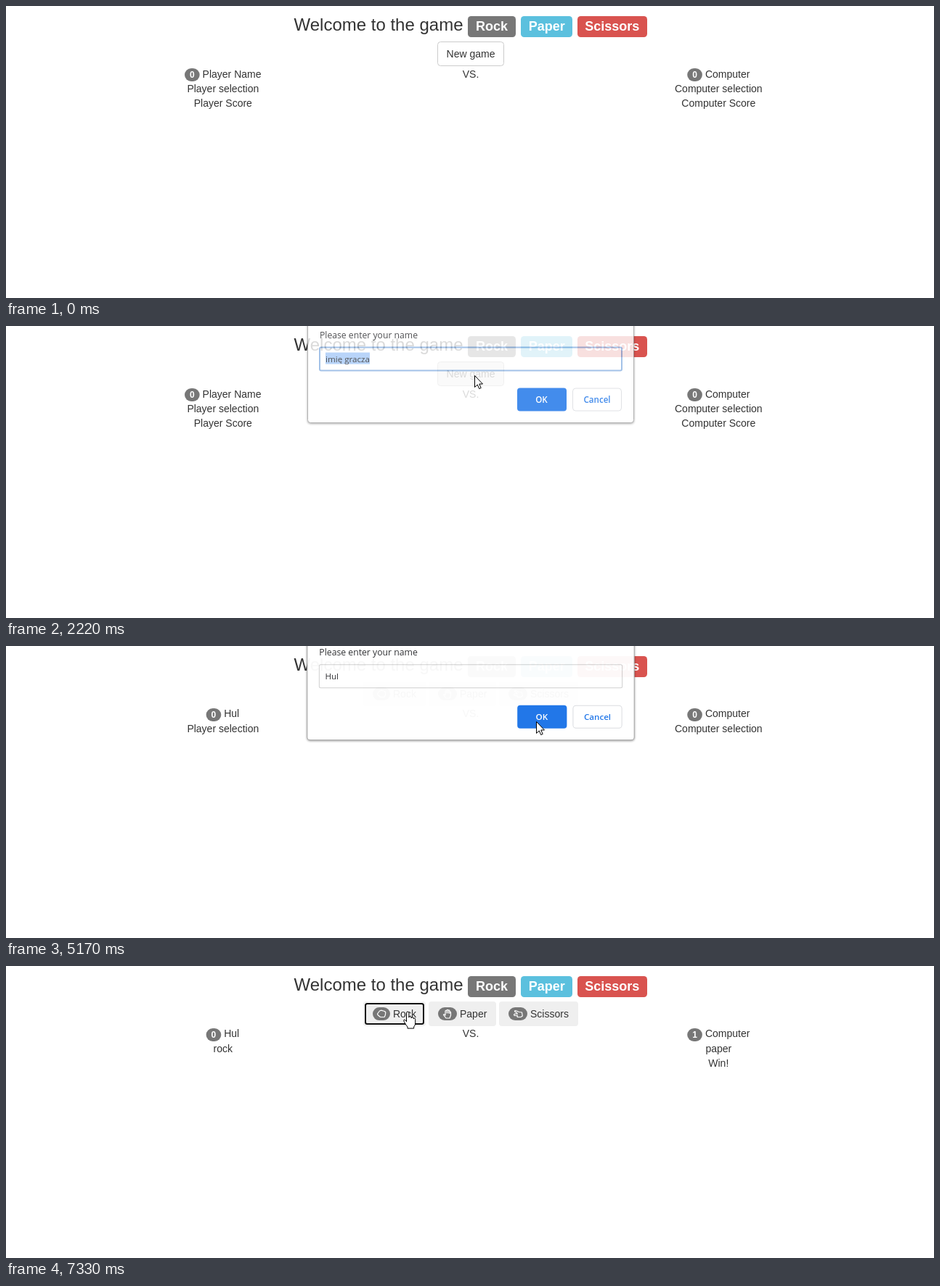
Recreate the animation shown at these times as an HTML page. Size 1278x403 px, loop 8000 ms.

```html
<!DOCTYPE html>
<html lang="en">
<head>
<meta charset="utf-8">
<title>Rock Paper Scissors</title>
<style>
  html, body { margin: 0; width: 100%; height: 100%; overflow: hidden; background: #fff; }
  svg { display: block; font: 14px "Liberation Sans", Arial, sans-serif; fill: #333; }
  .mid { text-anchor: middle; }
  .label { font-weight: bold; font-size: 18px; fill: #fff; }
  .badge { font-weight: bold; font-size: 12px; fill: #fff; text-anchor: middle; }
  .choice { fill: #efefef; }
  .pill { fill: #777; }
  .icon { fill: none; stroke: #fff; stroke-width: 1.2; stroke-linejoin: round; }
  #dialog { font: 12.2px "Open Sans", "Noto Sans", sans-serif; fill: #2b2c2f; }
  #dialog .btn { font-weight: 600; font-size: 11.6px; text-anchor: middle; }
  #entry { font-size: 11.6px; }
  #panel { fill: #fff; stroke: #a2a2a2; filter: drop-shadow(0 1px 1.5px rgba(0,0,0,.4)); }
  #cursor path { fill: #fff; stroke: #000; stroke-linejoin: round; }
</style>
</head>
<body>
<svg width="1278" height="403" viewBox="0 0 1278 403">
  <text x="396.5" y="34" font-size="24">Welcome to the game</text>
  <rect x="636" y="14" width="66" height="29" rx="4.5" fill="#777"/>
  <rect x="709" y="14" width="71" height="29" rx="4.5" fill="#5bc0de"/>
  <rect x="787" y="14" width="96" height="29" rx="4.5" fill="#d9534f"/>
  <g class="label">
    <text x="647" y="34">Rock</text>
    <text x="719.7" y="34">Paper</text>
    <text x="797.3" y="34">Scissors</text>
  </g>

  <g id="intro">
    <rect id="newGame" x="594.5" y="49.5" width="91" height="33" rx="4"/>
    <g class="mid">
      <text x="640" y="71">New game</text>
      <text x="640" y="99">VS.</text>
      <text x="298.8" y="139">Player Score</text>
      <text x="981.3" y="139">Computer Score</text>
    </g>
    <text x="270.6" y="99">Player Name</text>
    <text x="962.9" y="99">Computer</text>
  </g>

  <g id="match">
    <g class="choice">
      <rect x="492" y="49" width="86" height="34" rx="4"/>
      <rect x="582" y="49" width="93" height="34" rx="4"/>
      <rect x="679" y="49" width="109" height="34" rx="4"/>
    </g>
    <g id="focus" fill="none">
      <rect x="493.5" y="50.5" width="83" height="31" rx="4" stroke="#fff"/>
      <rect x="495" y="52" width="80" height="28" rx="2.5" stroke="#101010" stroke-width="2"/>
    </g>
    <g class="pill">
      <rect x="505" y="57" width="24" height="18" rx="9"/>
      <rect x="595" y="57" width="26" height="18" rx="9"/>
      <rect x="692" y="57" width="26" height="18" rx="9"/>
    </g>
    <g class="icon">
      <path d="M511.5 66l3-4 2-.8 5 1.3 1.3 1.5-.5 4-1.3 2.5h-5.5l-3.5-3z"/>
      <path d="M605 68v-6q1-1.500 2 0v3-4q1-1.500 2 0v4-3.500q1-1.200 1.900 0v4-2q1.600-1 1.600 1v3.500l-1.500 4h-5l-3.500-4.500q.5-1.800 2.500.5z"/>
      <path d="M704 65l-3.500-2.200q.3-1.800 2-1l4 1.700 4 .5.800 5-2.500 1.500h-4.300q-1.200-.9 0-2h-4q-1.800-1.600 0-2.300h4.500"/>
    </g>
    <text x="533" y="71">Rock</text>
    <text x="625" y="71">Paper</text>
    <text x="722" y="71">Scissors</text>
    <text x="300.200" y="98">Hul</text>
    <text x="962.900" y="98">Computer</text>
    <text class="mid" x="640" y="98">VS.</text>
  </g>

  <g id="playerBadge">
    <rect class="pill" y="86" width="20.700" height="18" rx="9"/>
    <text class="badge" x="10.350" y="99.300">0</text>
  </g>
  <rect class="pill" x="938.200" y="86" width="20.700" height="18" rx="9"/>
  <text id="rivalScore" class="badge" x="948.600" y="99.300"></text>
  <g class="mid">
    <text id="playerPick" x="298.800" y="119"></text>
    <text id="rivalPick" x="981.300" y="119"></text>
    <text id="verdict" x="981.300" y="139">Win!</text>
  </g>

  <g id="dialog">
    <rect id="panel" x="415.500" y="-20" width="449" height="155" rx="4"/>
    <text x="432" y="18">Please enter your name</text>
    <rect id="field" x="432" y="31" width="416" height="32" rx="2" fill="#fff"/>
    <rect id="selection" x="440" y="38" width="61" height="16" fill="#a9cbf8"/>
    <text id="entry" x="440" y="51"></text>
    <rect x="704" y="87" width="68" height="32" rx="4" fill="#1a73e8"/>
    <text class="btn" x="737.500" y="107" fill="#fff">OK</text>
    <rect x="780.500" y="87.500" width="67" height="31" rx="4" fill="#fff" stroke="#dadce0"/>
    <text class="btn" x="814" y="107" fill="#1a73e8">Cancel</text>
  </g>

  <g id="cursor">
    <path id="arrow" d="M.5.5V16.500L4.300 13 6.700 18.600 9.200 17.500 6.800 12H11.500Z"/>
    <path id="hand" d="M-1.500 14V1.800a1.700 1.700 0 0 1 3.400 0V8q0-1.500 1.600-1.500t1.600 1.500v1q0-1.200 1.600-1.200t1.600 1.300v1q0-1 1.200-1t1.200 1.300v5.500q0 3-2 5v2.200H0v-2q-2.500-3-4-6-2-3-1-3.700 1.500-1 3.500 2.100z"/>
  </g>
</svg>
<script>
const LOOP = 8000, NAME = "Hul";
const OPEN = 2060, CLOSE = 5170, FOCUS = 7250, RESULT = 7330;
const $ = id => document.getElementById(id);
const show = (id, on) => $(id).style.display = on ? "" : "none";
const put = (id, text) => { if ($(id).textContent !== text) $(id).textContent = text; };
const attr = (id, values) => {
  for (const key in values) $(id).setAttribute(key, values[key]);
};
const easeOut = p => 1 - (1 - p) ** 2;
const easeInOut = p => p * p * (3 - 2 * p);

// Progress from 0 to 1 in n visible positions, the last one reached at `end`.
function stepped(t, start, end, n) {
  const p = Math.min(1, Math.max(0, (t - start) / (end - start)));
  return Math.floor(p * (n - 1) + 1e-6) / (n - 1);
}

// Each move: start, end, positions, from, to, easing
const moves = [
  [1370, 1910, 8, [1073, 356], [645, 68], easeOut],
  [4540, 4990, 7, [644, 71], [730, 104], easeInOut],
  [6260, 6330, 2, [729, 103], [740, 103], easeOut],
  [6790, 7020, 4, [725, 100], [553, 63], easeOut]
];

function pointer(t) {
  const move = moves.filter(m => t >= m[0]).pop();
  if (!move) return null;
  const [start, end, n, from, to, ease] = move;
  const p = ease(stepped(t, start, end, n));
  return from.map((v, i) => Math.round(v + (to[i] - v) * p));
}

function drawPointer(t) {
  const at = pointer(t);
  show("cursor", at);
  const [x, y] = at || [0, 0];
  const within = (left, right) => x >= left && x < right && y >= 49 && y < 83;
  const overNew = t < CLOSE && within(594, 686);
  const overChoice = t >= CLOSE && (within(492, 578) || within(582, 675) || within(679, 788));
  const hand = t < OPEN + 160 && overNew || overChoice;
  show("hand", hand);
  show("arrow", !hand);
  attr("cursor", { transform: `translate(${x} ${y})` });
  attr("newGame", { fill: overNew ? "#e6e6e6" : "#fff", stroke: overNew ? "#adadad" : "#ccc" });
}

function drawDialog(t) {
  const closing = t >= CLOSE, late = t >= CLOSE + 90;
  show("dialog", t >= OPEN && t < CLOSE + 150);
  let opacity = easeOut(0.15 + 0.85 * stepped(t, OPEN, 2380, 5));
  let lift = 8 * (1 - opacity), scale = 1;
  if (closing) {
    opacity = late ? 0.4 : 0.965;
    lift = late ? 12 : 5.2;
    scale = late ? 1.006 : 1.003;
  }
  attr("dialog", {
    opacity,
    transform: `translate(640 ${-lift}) scale(${scale} 1) translate(-640 0)`
  });
  attr("field", { stroke: closing ? "#cfcfcf" : "#8fb5e3", "stroke-width": closing ? 1 : 2 });
  const typed = [3780, 3930, 3990].filter(time => t >= time).length;
  show("selection", !typed);
  put("entry", typed ? NAME.slice(0, typed) : "imię gracza");
}

function draw(t) {
  const playing = t >= CLOSE, done = t >= RESULT;
  show("intro", !playing);
  show("match", playing);
  show("focus", t >= FOCUS);
  show("verdict", done);
  attr("playerBadge", { transform: `translate(${playing ? 275.6 : 246} 0)` });
  put("rivalScore", done ? "1" : "0");
  put("playerPick", done ? "rock" : "Player selection");
  put("rivalPick", done ? "paper" : "Computer selection");
  drawDialog(t);
  drawPointer(t);
}

const begin = performance.now();
function tick() {
  draw((performance.now() - begin) % LOOP);
  requestAnimationFrame(tick);
}
tick();
</script>
</body>
</html>
```
